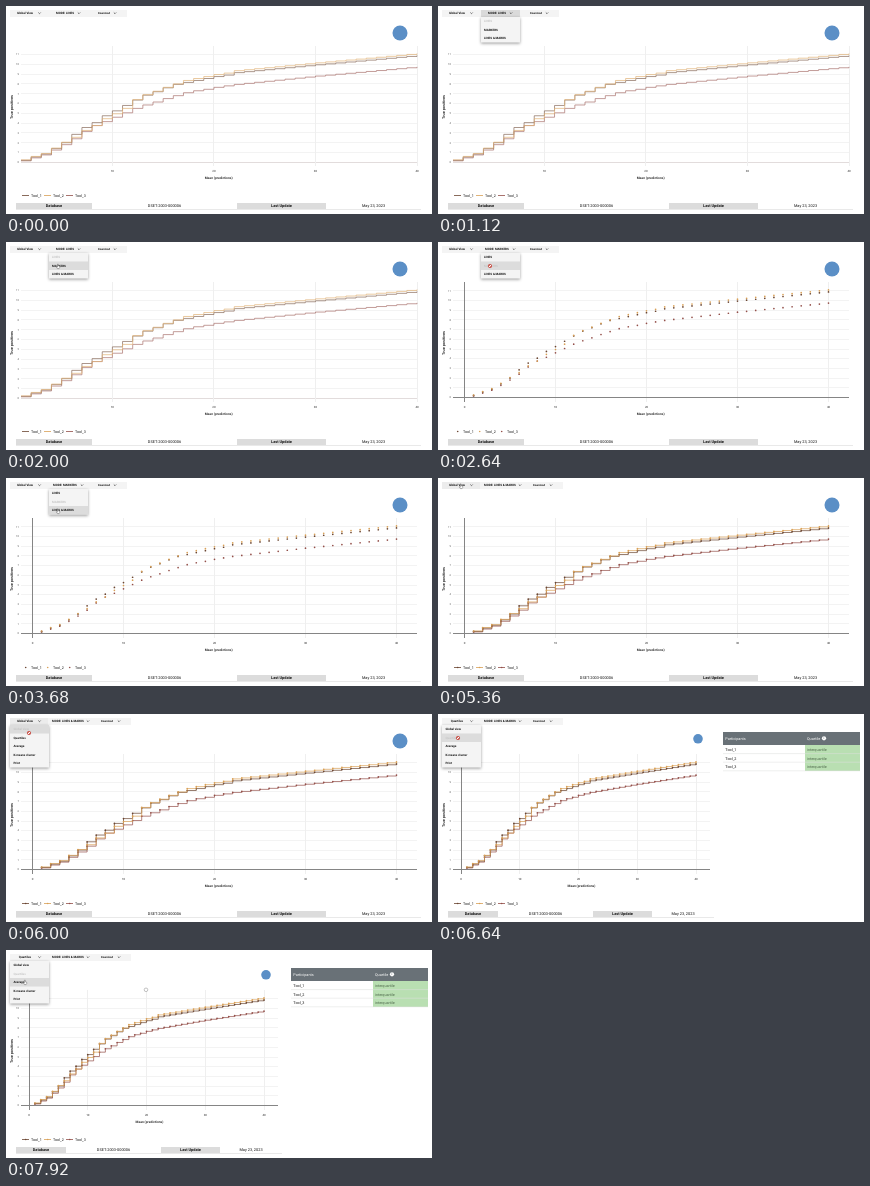
Recreate the animation shown at these times as an HTML page. Size 426 px wide and 208 px high, loop 8000 ms.

```html
<!DOCTYPE html>
<html lang="en">
<head>
<meta charset="utf-8">
<title>Benchmark chart</title>
<style>
  html, body { margin: 0; width: 100%; height: 100%; overflow: hidden; background: #fff; }
  svg { display: block; width: 426px; height: 208px; font-family: Roboto, "Open Sans", sans-serif; }
  text { text-rendering: geometricPrecision; }
  .grid { shape-rendering: crispEdges; }
</style>
</head>
<body>
<svg id="stage" viewBox="0 0 426 208"></svg>
<script>
const LOOP = 8000;
const stage = document.getElementById('stage');

function add(parent, tag, attrs, label) {
  const el = document.createElementNS('http://www.w3.org/2000/svg', tag);
  for (const k in attrs) el.setAttribute(k, attrs[k]);
  if (label !== undefined) el.textContent = label;
  parent.appendChild(el);
  return el;
}
const group = (parent = stage, attrs = {}) => add(parent, 'g', attrs);
const rect = (p, x, y, w, h, fill) => add(p, 'rect', { x, y, width: w, height: h, fill });
const line = (p, x1, y1, x2, y2, stroke, w = 1) =>
  add(p, 'line', { x1, y1, x2, y2, stroke, 'stroke-width': w });
const text = (p, x, y, s, size = 3, opt = {}) =>
  add(p, 'text', { x, y, 'font-size': size, fill: '#111', ...opt }, s);
const mid = { 'text-anchor': 'middle' };
const bold = { 'font-weight': 700 };
const caret = (p, x) =>
  add(p, 'path', { d: `M${x - 1.2} 6.5l1.2 1.2l1.2-1.2`, fill: 'none', stroke: '#222', 'stroke-width': 0.6 });

// Score by rank: dense at the start, straight between the last knots
const TOP = [.25, .6, .9, 1.45, 2.05, 2.9, 3.6, 4.1, 4.8, 5.3, 5.85, 6.4, 6.9, 7.25, 7.65, 8, 8.35, 8.55, 8.75, 8.95, 9.1, 9.35];
const LOW = [.15, .45, .75, 1.25, 1.8, 2.4, 3.15, 3.75, 4.15, 4.6, 5.05, 5.5, 5.85, 6.15, 6.5, 6.8, 7.1, 7.3, 7.45, 7.65, 7.8, 7.95];
function score(head, at30, at40, n) {
  if (n <= 22) return head[n - 1];
  return n <= 30 ? head[21] + (at30 - head[21]) * (n - 22) / 8 : at30 + (at40 - at30) * (n - 30) / 10;
}
const TOOLS = [
  { color: '#94504a', f: n => score(LOW, 8.8, 9.74, n) },
  { color: '#6b4632', f: n => score(TOP, 10.15, 11.1, n) - (n < 17 ? 0.05 : 0.2) },
  { color: '#d9a056', f: n => score(TOP, 10.15, 11.1, n) - (n > 5 && n < 12 ? 0.35 : 0) }
];

function plot({ x0, dx, right, y0, dy, lines, dots, zero, cx }) {
  const g = group();
  const grid = group(g, { class: 'grid' });
  const X = n => x0 + n * dx, Y = v => y0 - v * dy;
  const snap = v => Math.floor(v) + 0.5;
  for (let v = 0; v <= 11; v++) {
    line(grid, 15, snap(Y(v)), right, snap(Y(v)), v ? '#f3f3f3' : '#e2dcdc');
    text(g, 13, Y(v) + 0.8, v, 2.7, { 'text-anchor': 'end', fill: '#555' });
  }
  for (let n = zero ? 0 : 10; n <= 40; n += 10) {
    line(grid, snap(X(n)), 40, snap(X(n)), 160, '#efefef');
    text(g, X(n), 166.3, n, 2.9, { ...mid, fill: '#222' });
  }
  if (zero) {
    line(grid, 15, snap(y0), right, snap(y0), '#858585');
    line(grid, snap(x0), 40, snap(x0), 160, '#858585');
  }
  const data = group(g, { opacity: dots ? 1 : 0.8 });
  for (const { color, f } of TOOLS) {
    if (lines) {
      let d = `M${X(1)} ${Y(f(1))}`;
      for (let n = 2; n <= 40; n++) d += `H${X(n)}V${Y(f(n))}`;
      add(data, 'path', { d, fill: 'none', stroke: color, 'stroke-width': 0.7 });
    }
    if (dots) for (let n = 1; n <= 40; n++)
      add(data, 'circle', { cx: X(n), cy: Y(f(n)), r: 0.85, fill: color });
  }
  ['#6b4632', '#d9a056', '#94504a'].forEach((c, i) => {
    const x = 16 + i * 22;
    if (lines) line(g, x, 189.5, x + 7, 189.5, c, 0.8);
    if (dots) add(g, 'circle', { cx: x + 3.7, cy: 189.5, r: 0.8, fill: c });
    text(g, x + 9, 190.6, 'Tool_' + (i + 1), 3.7);
  });
  text(g, cx, 172.9, 'Mean (predictions)', 3.3, { ...mid, 'font-weight': 500 });
  text(g, 6.7, 101, 'True positives', 3.8, { ...mid, 'font-weight': 500, transform: 'rotate(-90 6.7 101)' });
  return g;
}

function footer(g, edges) {
  line(g, edges[0], 203.5, edges[4], 203.5, '#e9e9e9');
  ['Database', 'DSET:2003-000006', 'Last Update', 'May 23, 2023'].forEach((s, i) => {
    const a = edges[i], b = edges[i + 1], head = i % 2 === 0;
    if (head) rect(g, a, 197, b - a, 6, '#dcdcdc');
    text(g, (a + b) / 2, 201.3, s, 3.9, { ...mid, 'font-weight': head ? 700 : 400 });
  });
}

function results(g) {
  rect(g, 285, 18, 137, 13, '#697177');
  text(g, 287.3, 26.2, 'Participants', 3.8, { fill: '#fff' });
  text(g, 369, 26.2, 'Quartile', 3.8, { fill: '#fff' });
  add(g, 'circle', { cx: 386, cy: 24.3, r: 2.1, fill: '#fff' });
  text(g, 386, 25.4, 'i', 3, { ...mid, ...bold, fill: '#697177' });
  rect(g, 367, 31, 55, 26, '#b9dfb2');
  for (let i = 0; i < 3; i++) {
    const y = 31 + i * 8.6;
    text(g, 287.3, y + 6.1, 'Tool_' + (i + 1), 3.8);
    text(g, 369, y + 6.1, 'interquartile', 3.7, { fill: '#4c6749' });
    line(g, 285, y + 8.6, 422, y + 8.6, '#dcdfdc', 0.5);
  }
}

function menu(x, items, textX) {
  const g = group(), h = items.length * 8.5;
  g.style.filter = 'drop-shadow(0 1px 1.5px rgba(0,0,0,.4))';
  rect(g, x, 11, 39, h, '#f4f4f4');
  const hover = rect(g, x, 11, 39, 8.5, '#dcdcdc');
  const labels = items.map((s, i) => text(g, textX, 16.1 + i * 8.5, s, 3, bold));
  return { g, hover, labels };
}

const wide = { x0: 26.5, dx: 9.1, right: 411, y0: 155.4, dy: 9.68, zero: true, cx: 212.7 };
const plots = [
  plot({ x0: 4.85, dx: 10.154, right: 411, y0: 156.3, dy: 9.8, lines: true, cx: 212.7 }),
  plot({ ...wide, dots: true }),
  plot({ ...wide, lines: true, dots: true }),
  plot({ ...wide, x0: 23, dx: 5.875, right: 271.5, cx: 143.5, lines: true, dots: true })
];
const wideUi = group(), slimUi = group();
add(wideUi, 'circle', { cx: 394, cy: 27, r: 7.5, fill: '#5b8fc6' });
footer(wideUi, [10, 86, 231, 320, 415]);
add(slimUi, 'circle', { cx: 260, cy: 24.8, r: 4.8, fill: '#5b8fc6' });
footer(slimUi, [10, 60, 155, 214, 276]);
results(slimUi);
const ring = add(stage, 'circle', { cx: 140, cy: 39.8, r: 1.8, fill: '#fff', stroke: '#999', 'stroke-width': 0.6 });

// Toolbar, one version per chart mode
const bars = [
  ['MODE: LINES', 50, 73, 92, 109, 121],
  ['MODE: MARKERS', 47, 76, 92, 109, 121],
  ['MODE: LINES & MARKS', 46, 82, 95, 113, 125]
].map(([s, x, c1, x2, c2, end]) => {
  const g = group();
  rect(g, 4, 4, end - 4, 7, '#f4f4f4');
  g.hot = rect(g, 43, 4, 39, 7, '#dadada');
  text(g, x, 8.3, s, 3, bold);
  caret(g, c1);
  text(g, x2, 8.3, 'Download', 2.7, bold);
  caret(g, c2);
  return g;
});
const viewHot = rect(stage, 4, 4, 38, 7, '#ececec');
const viewName = text(stage, 19, 8.3, '', 3, { ...mid, ...bold });
caret(stage, 33.5);

const modeMenu = menu(43, ['LINES', 'MARKERS', 'LINES & MARKS'], 46);
const viewMenu = menu(4, ['Global view', 'Quartiles', 'Average', 'K-means cluster', 'Print'], 7.4);

const hand = add(stage, 'path', {
  d: 'M-.6-1.8h.9v1.6l1.4.4v1.6l-.6.8h-1.7l-1.2-1.7l.5-.3l.7.5z',
  fill: '#fff', stroke: '#444', 'stroke-width': 0.4
});
const stop = group();
add(stop, 'circle', { r: 1.7, fill: '#fff', stroke: '#c0392f', 'stroke-width': 0.8 });
line(stop, -1.1, -1.1, 1.1, 1.1, '#c0392f', 0.7);

// Pointer path: time, x, y
const PATH = [
  [1440, 62, 9], [1760, 52, 24], [3360, 52, 24], [3680, 52, 33], [4880, 52, 33], [5360, 23, 8],
  [5600, 23, 8], [5840, 23, 19], [6080, 23, 19], [6320, 20, 24], [7200, 20, 24], [7440, 19, 32]
];
function pointer(t) {
  const i = PATH.findIndex(p => p[0] > t);
  if (i < 0) return PATH[PATH.length - 1].slice(1);
  if (i === 0) return PATH[0].slice(1);
  const [a, ax, ay] = PATH[i - 1], [b, bx, by] = PATH[i];
  let k = (t - a) / (b - a);
  k = k * k * (3 - 2 * k);
  return [ax + (bx - ax) * k, ay + (by - ay) * k];
}

const show = (el, on) => { el.style.display = on ? '' : 'none'; };
const ramp = (t, a, d = 160) => Math.max(0, Math.min(1, (t - a) / d));

function update(m, opacity, row, picked) {
  show(m.g, opacity > 0);
  m.g.style.opacity = opacity;
  show(m.hover, row >= 0 && row < m.labels.length);
  m.hover.setAttribute('y', 11 + Math.max(0, row) * 8.5);
  m.labels.forEach((el, i) => el.setAttribute('fill', i === picked ? '#c6c6c6' : '#111'));
}

function render(t) {
  const mode = t < 2320 ? 0 : t < 4640 ? 1 : 2;
  const slim = t >= 6400;
  const view = slim ? 1 : 0;
  plots.forEach((p, i) => show(p, i === (slim ? 3 : mode)));
  bars.forEach((b, i) => { show(b, i === mode); show(b.hot, t >= 560 && t < 1600); });
  show(wideUi, !slim);
  show(slimUi, slim);
  show(ring, t >= 7600);
  show(viewHot, t >= 5360 && t < 6080);
  viewName.textContent = view ? 'Quartiles' : 'Global View';

  const [x, y] = pointer(t);
  const inMode = t >= 1440 && t < 5040, inView = t >= 5520;
  const row = Math.floor((y - 11) / 8.5);
  update(modeMenu, ramp(t, 720) * (1 - ramp(t, 5040)), inMode ? row : -1, mode);
  update(viewMenu, ramp(t, 5520), inView ? row : -1, view);

  const blocked = inMode && row === mode || inView && row === view;
  show(hand, t >= 1440 && !blocked);
  show(stop, blocked);
  for (const el of [hand, stop]) el.setAttribute('transform', `translate(${x} ${y})`);
}

const start = performance.now();
function tick() {
  render((performance.now() - start) % LOOP);
  requestAnimationFrame(tick);
}
tick();
</script>
</body>
</html>
```
